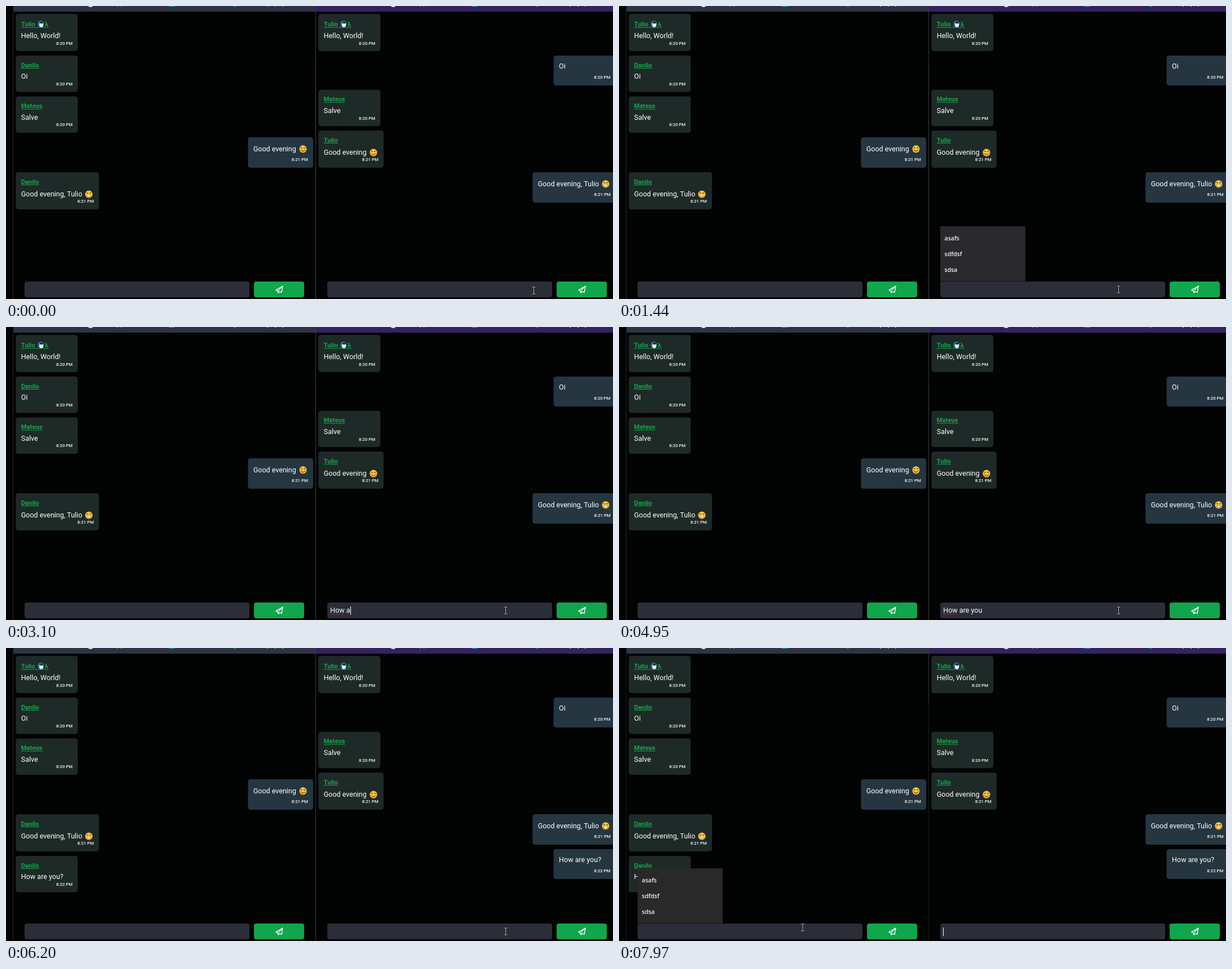
These frames come from a looping animation (1077x520 px, 8000 ms). An HTML page with a canvas:

```html
<!DOCTYPE html>
<html lang="en">
<head>
<meta charset="utf-8">
<title>Chat</title>
<style>
  html, body { margin: 0; width: 100%; height: 100%; overflow: hidden; background: #020303; }
  canvas { display: block; }
</style>
</head>
<body>
<canvas id="stage" width="1077" height="520"></canvas>
<script>
const ctx = document.getElementById('stage').getContext('2d');
const LOOP = 8000;
const RIGHT = 537; // horizontal distance between both windows
const BODY = '12.5px Roboto, sans-serif';
const NAME = 'bold 11.2px Roboto, sans-serif';
const TIME = '500 7.8px Roboto, sans-serif';
const LIST = '600 10.5px "Open Sans", sans-serif';
const GREEN = '#15a54c';

const QUESTION = 'How are you?';
const KEY_TIMES = [1760, 2070, 2310, 2860, 3100, 3330, 3560, 3790, 3940, 4170, 4400, 5420];
const SENT = 6030;
const RECEIVED = 6110;

const lerp = (a, b, k) => a + (b - a) * k;
const clamp = k => Math.max(0, Math.min(1, k));
const within = (t, a, b) => t >= a && t < b;

function rect(x, y, w, h, color, radius = 0) {
  ctx.fillStyle = color;
  ctx.beginPath();
  ctx.roundRect(x, y, w, h, radius);
  ctx.fill();
}

function disc(x, y, r, color) {
  ctx.fillStyle = color;
  ctx.beginPath();
  ctx.arc(x, y, r, 0, Math.PI * 2);
  ctx.fill();
}

function oval(x, y, rx, ry, color) {
  ctx.fillStyle = color;
  ctx.beginPath();
  ctx.ellipse(x, y, rx, ry, 0, 0, Math.PI * 2);
  ctx.fill();
}

function text(str, x, y, font, color = '#fff', align = 'left') {
  ctx.font = font;
  ctx.fillStyle = color;
  ctx.textAlign = align;
  ctx.fillText(str, x, y);
}

function polygon(points, fill, stroke, width = 1) {
  ctx.beginPath();
  points.forEach(([x, y]) => ctx.lineTo(x, y));
  ctx.closePath();
  if (fill) { ctx.fillStyle = fill; ctx.fill(); }
  if (stroke) { ctx.strokeStyle = stroke; ctx.lineWidth = width; ctx.stroke(); }
}

function smiley(x, y, grin) {
  disc(x, y, 6.6, '#f9b52f');
  disc(x, y - 0.6, 5.6, '#ffc83d');
  ctx.strokeStyle = '#56381c';
  ctx.lineWidth = 1.1;
  for (const side of [-2.7, 2.7]) {
    ctx.beginPath();
    ctx.arc(x + side, y - 1, 1.5, Math.PI * 1.1, Math.PI * 1.9);
    ctx.stroke();
  }
  if (grin) {
    rect(x - 4, y + 0.8, 8, 3.8, '#7b5128', [1, 1, 3, 3]);
    rect(x - 3.3, y + 1.3, 6.6, 2.6, '#fff', [1, 1, 2, 2]);
  } else {
    oval(x - 4.4, y + 1.3, 1.5, 1.1, '#f58a3c');
    oval(x + 4.4, y + 1.3, 1.5, 1.1, '#f58a3c');
    ctx.beginPath();
    ctx.arc(x, y + 0.8, 3, Math.PI * 0.1, Math.PI * 0.9);
    ctx.stroke();
  }
}

function penguin(x, y) {
  oval(x, y, 5.6, 6.2, '#2d6f9e');
  oval(x + 0.8, y + 1.2, 3.6, 4.6, '#e9f1f5');
  oval(x + 1, y - 2.6, 2.6, 2, '#17262f');
  oval(x + 1, y - 0.6, 1.2, 0.8, '#e6a23a');
}

function nameLabel(name, x, y, badge) {
  text(name, x, y + 4, NAME, GREEN);
  let width = ctx.measureText(name).width;
  if (badge) {
    text('λ', x + 42, y + 4, NAME, GREEN);
    width = 49;
  }
  rect(x, y + 5.4, width, 1, GREEN);
  if (badge) penguin(x + 35, y);
}

// nameY, msgY and timeY are the vertical centres of each row
function bubble({ x, y, w, h, name, nameY, msg, msgY, time, timeY, face, badge }) {
  rect(x, y, w, h, name ? '#1e2a27' : '#253641', 4.5);
  if (name) nameLabel(name, x + 9.5, nameY, badge);
  text(msg, x + 9.5, msgY + 4.4, BODY);
  text(time, x + w - 9.2, timeY + 2.8, TIME, '#f4f6f6', 'right');
  if (face) smiley(x + w - 18, msgY + 0.3, face === 'grin');
}

const greeting = 'Hello, World!', evening = 'Good evening', reply = 'Good evening, Tulio';

function received(x, y, name, msg, time) {
  bubble({ x, y, w: 110, h: 64.5, name, nameY: y + 16.5, msg, msgY: y + 37, time, timeY: y + 50 });
}

function sent(x, y, w, msg, time, face) {
  bubble({ x, y, w, h: face ? 54 : 53, msg, msgY: y + (face ? 20.5 : 19),
    time, timeY: y + (face ? 39.5 : 38.5), face });
}

function receivedFace(x, y, w, name, msg, face) {
  bubble({ x, y, w, h: 66, name, nameY: y + 16.7, msg, msgY: y + 38.8,
    time: '8:21 PM', timeY: y + 51.5, face });
}

function hello(x) {
  bubble({ x, y: 14, w: 110, h: 66, name: 'Tulio', nameY: 32, badge: true,
    msg: greeting, msgY: 53, time: '8:20 PM', timeY: 65.8 });
}

function messages(t) {
  hello(17.3);
  received(17.3, 88, 'Danilo', 'Oi', '8:20 PM');
  received(17.3, 160.5, 'Mateus', 'Salve', '8:20 PM');
  sent(429.3, 233, 115.7, evening, '8:21 PM', 'smile');
  receivedFace(17.3, 295, 147.7, 'Danilo', reply, 'grin');
  if (t >= RECEIVED) received(17.3, 369, 'Danilo', QUESTION, '8:22 PM');

  hello(554.3);
  sent(971.6, 88, 110, 'Oi', '8:20 PM');
  received(554.3, 148.7, 'Mateus', 'Salve', '8:20 PM');
  receivedFace(554.3, 221, 115.7, 'Tulio', evening, 'smile');
  sent(934.2, 295, 147.7, reply, '8:21 PM', 'grin');
  if (t >= SENT) sent(971.6, 357, 110, QUESTION, '8:22 PM');
}

function header(x, width, color) {
  rect(x, 0, width, 10, color);
  disc(x + 137, -4, 6, '#e8eaee');
  for (const dx of [184, 191]) rect(x + dx, 0, 1.2, 1, '#c9ccd4');
  rect(x + 276, 0, 10, 1, '#2f9fc4');
  disc(x + 393, 0, 1.8, GREEN);
  for (const dx of [450, 464, 477]) rect(x + dx, 0, 2, 1, '#c9ccd4');
}

function composer(x) {
  rect(x, 489, 399, 28, '#2b2e39', 4);
  rect(x + 407, 489, 89, 28, '#10a64c', 4);
  ctx.lineJoin = 'round';
  const cx = x + 452, cy = 503;
  const at = points => points.map(([px, py]) => [cx + px, cy + py]);
  polygon(at([[6, -5.8], [-6.2, 1.2], [-2.6, 2.8], [-2, 6], [0.3, 4], [4, 5.2]]), null, '#fff', 1.4);
  polygon(at([[6, -5.8], [-2.6, 2.8]]), null, '#fff', 1.2);
}

function dropdown(x, color) {
  rect(x, 391, 151, 97.5, color);
  ['asafs', 'sdfdsf', 'sdsa'].forEach((item, i) => text(item, x + 7.6, 415.5 + i * 28.3, LIST, '#f3f3f3'));
}

function squiggle(x, width) {
  ctx.strokeStyle = '#c8283c';
  ctx.lineWidth = 0.8;
  ctx.beginPath();
  for (let i = 0; i <= width; i++) ctx.lineTo(x + i, 509.6 + Math.sin(i * Math.PI / 2) * 0.6);
  ctx.stroke();
}

function typing(t) {
  const x = 575.3;
  const count = t < SENT ? KEY_TIMES.filter(key => t >= key).length : 0;
  const typed = QUESTION.slice(0, count);
  ctx.font = BODY;
  const widthOf = str => ctx.measureText(str).width;
  if (t >= 2930 && t < SENT) squiggle(x, widthOf('How'));
  if (t >= 5500 && t < SENT) squiggle(x + widthOf('How are '), widthOf('you'));
  text(typed, x, 507.3, BODY);

  const caretOn = within(t, 820, 1440) || within(t, 1760, 4950) || within(t, 5420, SENT) ||
    within(t, 6570, 7070) || t >= 7580;
  if (caretOn) rect(Math.round(x + widthOf(typed)), 496, 1, 15, '#fff');
}

function ibeam(x, y) {
  const strokeBeam = (color, width) => {
    ctx.strokeStyle = color;
    ctx.lineWidth = width;
    ctx.beginPath();
    for (const end of [-6, 6]) {
      ctx.moveTo(x - 2.5, y + end);
      ctx.lineTo(x + 3.5, y + end);
    }
    ctx.moveTo(x + 0.5, y - 6);
    ctx.lineTo(x + 0.5, y + 6);
    ctx.stroke();
  };
  strokeBeam('#111', 2.4);
  strokeBeam('#c4c4c4', 1);
}

function arrow(x, y) {
  const shape = [[0, 0], [0, 12], [2.7, 9.5], [4.7, 14], [6.6, 13.1], [4.7, 8.8], [8.2, 8.6]];
  polygon(shape.map(([px, py]) => [x + px, y + py]), '#fff', '#111', 0.9);
}

function pointer(t) {
  if (t < 6740) {
    const first = t < 70 ? 0 : clamp((Math.floor((t - 70) / 66) + 1) / 4);
    const second = t < 500 ? 0 : clamp((Math.floor((t - 500) / 75) + 1) / 3);
    ibeam(lerp(lerp(936, 892, first), 886, second), lerp(lerp(505, 504, first), 503, second));
  } else if (t < 7500) {
    const k = clamp((Math.floor((t - 6740) / 75) + 1) / 10);
    const e = k * k * (3 - 2 * k);
    const bend = (a, b, c) => lerp(lerp(a, b, e), lerp(b, c, e), e);
    const x = bend(886, 600, 336), y = bend(503, 430, 486);
    (x > 570 && y > 489 ? ibeam : arrow)(x, y);
  } else if (t < 7580) {
    arrow(328, 488);
  } else {
    ibeam(325.5, 496);
  }
}

function borders(t) {
  const rightActive = within(t, 820, 7880);
  rect(12, 10, 1, 510, t >= 7880 ? '#181a1b' : '#25282a');
  rect(549, 0, 1, 100, '#34383b');
  rect(549, 100, 1, 420, t >= 7880 ? '#1b1d1e' : rightActive ? '#3a3b3d' : '#404143');
}

function draw(now) {
  const t = now % LOOP;
  rect(0, 0, 1077, 520, '#020303');
  header(13, 536, '#2f3444');
  header(13 + RIGHT, 527, '#35235f');
  borders(t);
  messages(t);
  composer(33);
  composer(33 + RIGHT);
  if (within(t, 940, 1760)) dropdown(570, '#2a2a2e');
  if (t >= 7970) dropdown(33, '#292929');
  typing(t);
  pointer(t);
  requestAnimationFrame(draw);
}

requestAnimationFrame(draw);
</script>
</body>
</html>
```
